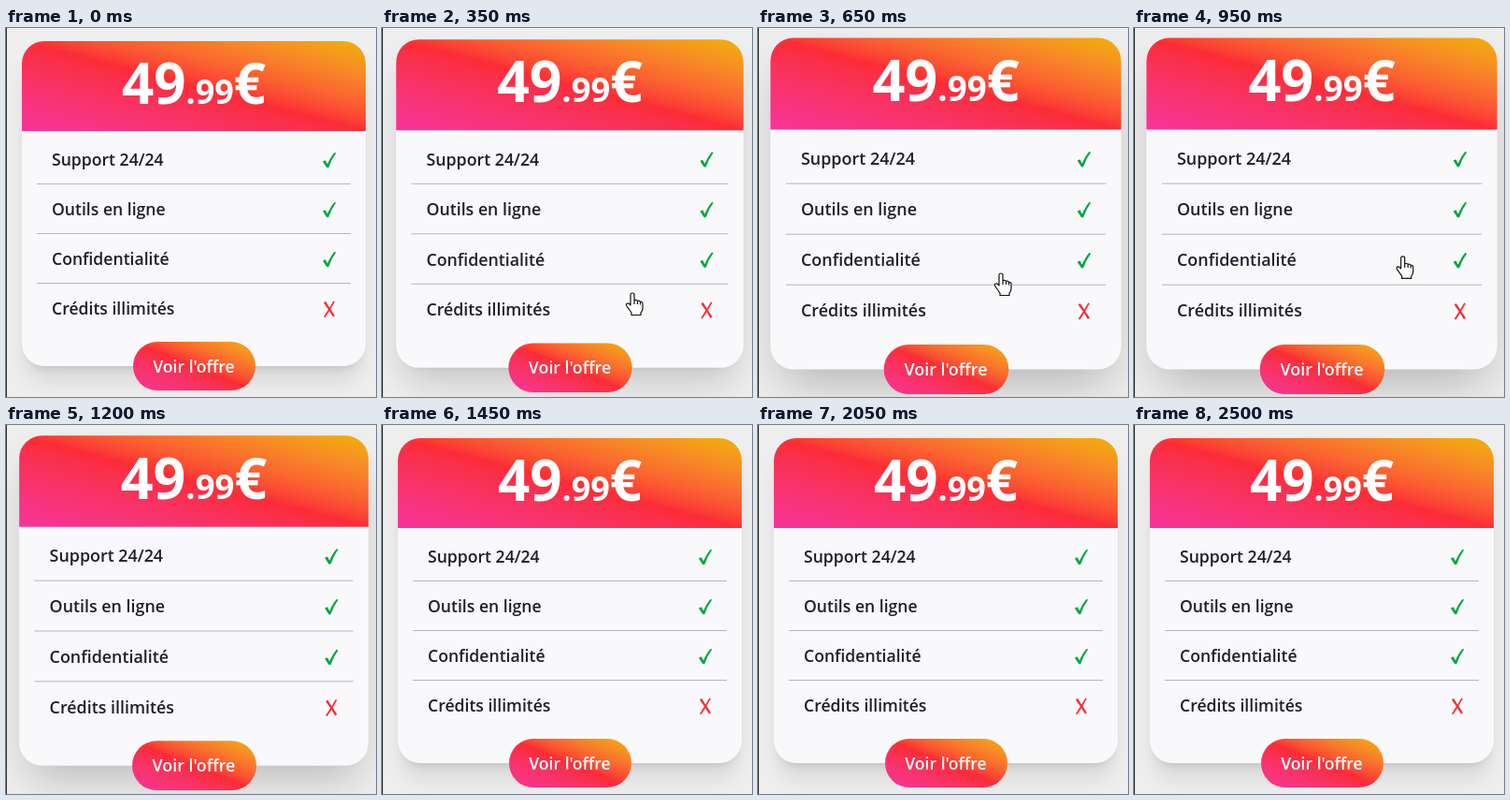
Animation, 396 px wide and 394 px high, one loop 2550 ms. Source, as an HTML page:

```html
<!DOCTYPE html>
<html lang="fr">
<head>
<meta charset="utf-8">
<style>
  html, body { margin: 0; width: 100%; height: 100%; overflow: hidden; background: #eee; }
  #stage { position: relative; width: 396px; height: 394px; overflow: hidden; }
  #stage div, svg { position: absolute; }
  #edge { left: 0; top: 0; width: 1px; height: 394px; background: #333; }
  #offer { inset: 0; transform-origin: 201px 187.5px; }
  #card { left: 17px; top: 14px; width: 368px; height: 347px; border-radius: 24px; background: #f9f9fc; }
  .warm { background: linear-gradient(to top right in oklab, #f6339a, #fb2c36, #f0b100); }
  #head { left: 17px; top: 14px; width: 368px; height: 96px; border-radius: 24px 24px 0 0; }
  #button { left: 135.5px; top: 335px; width: 131px; height: 52px; border-radius: 26px; }
  svg { left: 0; top: 0; overflow: visible; }
  text { font: 600 17.6px "Open Sans", "Noto Sans", sans-serif; fill: #1f2026; }
  .white { fill: #fff; text-anchor: middle; }
  .price { font-size: 60px; font-weight: 700; }
  .cents { font-size: 36px; }
</style>
</head>
<body>
<div id="stage">
  <div id="edge"></div>
  <div id="offer">
    <div id="card"></div>
    <div id="head" class="warm"></div>
    <div id="button" class="warm"></div>
    <svg width="396" height="394">
      <text class="white price" x="201" y="80.5">49<tspan class="cents">.99</tspan>€</text>
      <g id="rows"></g>
      <text class="white" x="201" y="367.5">Voir l'offre</text>
    </svg>
  </div>
  <svg width="396" height="394">
    <path id="hand" fill="#fff" stroke="#111" stroke-width="1.2" stroke-linejoin="round"
      d="M-2 13V1.5Q-2 0 0 0T2 1.5V8Q4 6.5 5.5 8.5Q7.5 7.5 8.5 9.5Q11 9 11 12V16Q11 19 9 21V23.5H-1V21L-6 14Q-7.5 11.5-5.5 11Q-4 10.5-2 13ZM2 8V12M5.5 8.5V12M8.5 9.5V12.5"/>
  </svg>
</div>
<script>
const $ = id => document.getElementById(id);
const LOOP = 2550, STEP = 50, FADE = 300, ENTER = 262, LEAVE = 1150;

const check = 'M-7 1.5L-4.2 .2L-2 4.5Q1.5-3.5 5.5-8L7.2-7.4Q1.8 0-.7 8L-2.8 8Z';
const cross = 'M-6-6.5L-4-8.2L.3-1.6L4.4-8.6L6-8L1.4 .1L6 7.2L4 8.5L.1 2.2L-4.4 9L-6 8.2L-1 .4Z';
const rows = ['Support 24/24', 'Outils en ligne', 'Confidentialité', 'Crédits illimités'];
$('rows').innerHTML = rows.map((label, i) => {
  const y = 141 + 53 * i, last = i === 3;
  return `<text x="49" y="${y + 6}">${label}</text>
    <path transform="translate(346 ${y})" d="${last ? cross : check}" fill="${last ? '#fb2c36' : '#00a63e'}"/>` +
    (last ? '' : `<rect x="33" y="${y + 25}" width="336" height="1" fill="#b6b7bc"/>`);
}).join('');

// CSS "ease": cubic-bezier(.25, .1, .25, 1)
function ease(x) {
  if (x <= 0) return 0;
  if (x >= 1) return 1;
  const curve = (s, a, b) => 3 * (1 - s) ** 2 * s * a + 3 * (1 - s) * s * s * b + s ** 3;
  let low = 0, high = 1;
  for (let i = 0; i < 20; i++) {
    const mid = (low + high) / 2;
    if (curve(mid, .25, .25) < x) low = mid; else high = mid;
  }
  return curve(low, .1, 1);
}

// time, x, y of the fingertip
const path = [[220, 294, 400], [350, 268, 283], [650, 260, 262], [800, 262, 256], [1150, 402, 190]];

function pointer(t) {
  const i = path.findIndex(p => p[0] > t);
  if (i < 1) return null;
  const [t0, x0, y0] = path[i - 1], [t1, x1, y1] = path[i];
  const k = (t - t0) / (t1 - t0), u = i === 2 ? 1 - (1 - k) ** 2 : i === 4 ? k * k : k;
  return [x0 + (x1 - x0) * u, y0 + (y1 - y0) * u];
}

function draw(now) {
  const t = Math.floor(now % LOOP / STEP) * STEP;
  const hover = ease((t - ENTER) / FADE) - ease((t - LEAVE) / FADE);
  const mix = (a, b) => a + (b - a) * hover;
  $('offer').style.transform = `scale(${mix(1, 1.02)})`;
  $('card').style.boxShadow =
    `0 ${mix(20, 25)}px ${mix(25, 50)}px ${mix(-5, -12)}px rgba(0,0,0,${mix(.1, .25)}),` +
    `0 ${mix(8, 0)}px ${mix(10, 0)}px ${mix(-6, 0)}px rgba(0,0,0,${mix(.1, 0)})`;
  const tip = pointer(t);
  $('hand').style.display = tip ? '' : 'none';
  if (tip) $('hand').setAttribute('transform', `translate(${tip})`);
  requestAnimationFrame(draw);
}
requestAnimationFrame(draw);
</script>
</body>
</html>
```
